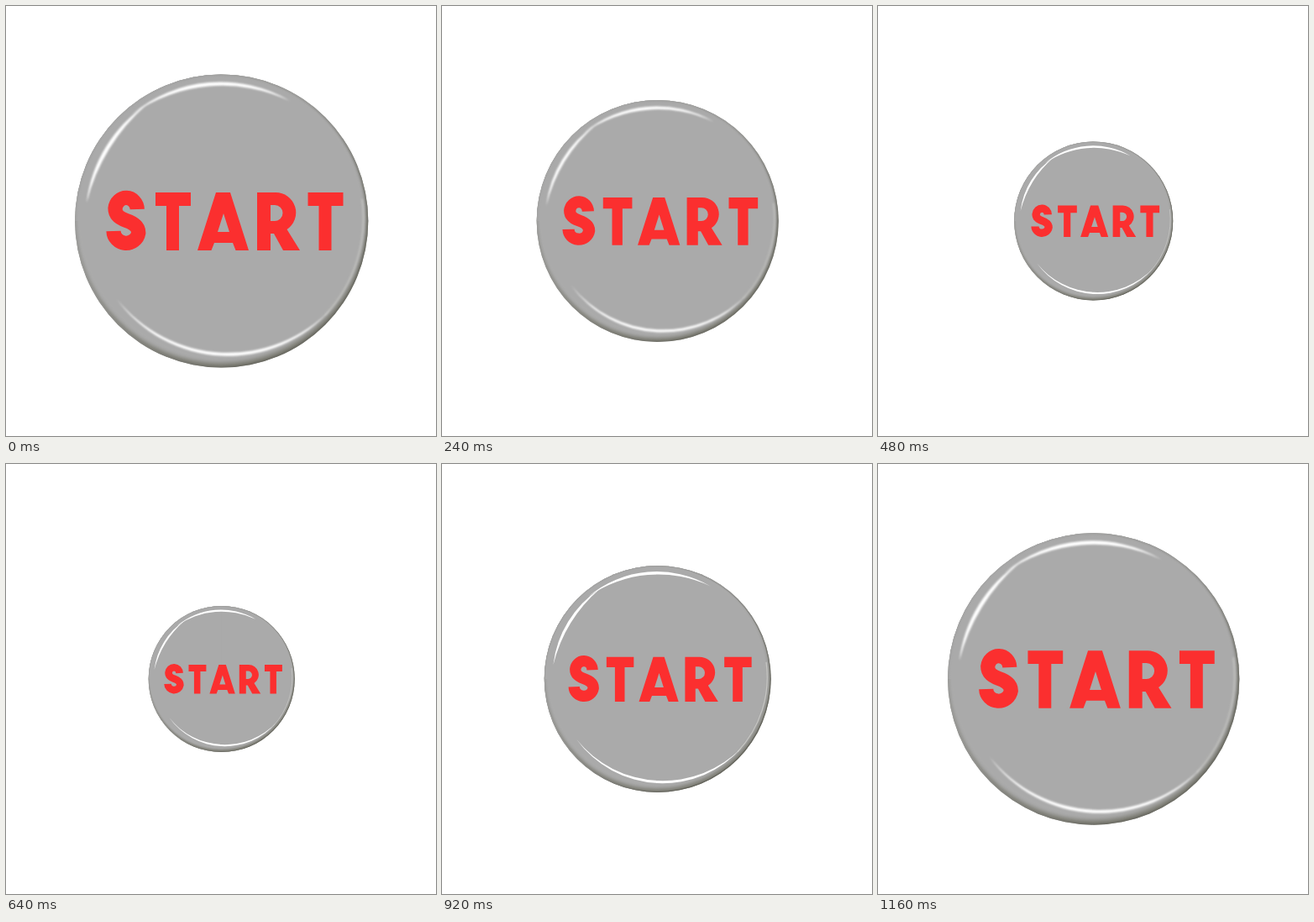
Animation, 512 px wide and 512 px high, one loop 1200 ms. Source, as an HTML page:

```html
<!DOCTYPE html>
<html lang="en">
<head>
<meta charset="utf-8">
<title>Start button</title>
<style>
  html, body { margin: 0; width: 100%; height: 100%; overflow: hidden; background: #fff; }
  svg { display: block; width: 100vw; height: 100vh; }
  text { font: 900 90px Inter, Arial, sans-serif; fill: transparent; }
</style>
</head>
<body>
<svg viewBox="0 0 512 512" role="img" aria-label="START">
  <defs>
    <linearGradient id="edge" x1=".2" y1=".1" x2=".85" y2=".75">
      <stop offset="0" stop-color="#a4a4a4"/>
      <stop offset=".45" stop-color="#969694"/>
      <stop offset="1" stop-color="#66665e"/>
    </linearGradient>
    <filter id="soft" x="-10%" y="-10%" width="120%" height="120%"><feGaussianBlur stdDeviation="2.6"/></filter>
    <filter id="glow" x="-10%" y="-20%" width="120%" height="140%"><feGaussianBlur stdDeviation="1"/></filter>
    <clipPath id="disc"><circle cx="256.7" cy="256" r="174.6"/></clipPath>
  </defs>
  <g id="button">
    <circle cx="256.7" cy="256" r="174.6" fill="#7c7c73"/>
    <g clip-path="url(#disc)">
      <circle cx="255.5" cy="251" r="173.5" fill="#aaa" stroke="#aaa" stroke-width="1" filter="url(#soft)"/>
      <path d="M256 81A174 174 0 0 0 82 256L256 256Z" fill="#aaa"/>
      <circle cx="256.7" cy="256" r="174.3" fill="none" stroke="url(#edge)" stroke-width="2.6" filter="url(#glow)"/>
    </g>
    <g filter="url(#glow)">
      <path d="M424 230A168 168 0 0 1 380 368" fill="none" stroke="#c6c6c3" stroke-width="1.6"/>
      <g fill="#fff">
        <path d="M96 234A163 163 0 0 1 168 117A228 228 0 0 0 96 234Z"/>
        <path d="M150 129A163 163 0 0 1 338 113A187 187 0 0 0 150 129Z"/>
        <path d="M132 349A163 163 0 0 0 387 361A170 170 0 0 1 132 349Z"/>
      </g>
    </g>
    <text x="120" y="291">START</text>
    <g fill="#fb2f2f" fill-rule="evenodd">
      <path d="M156.3 242A13.2 14.2 0 0 0 130 241C130 249 135 252.5 143 255.3C151 258 157.8 262 157.8 270A15 14.7 0 0 1 128 268" fill="none" stroke="#fb2f2f" stroke-width="17.2"/>
      <path id="t" d="M178 222H220V238H206V291H191V238H178Z"/>
      <path d="M250 222H267L289 291H273.5L270 282H248L244.5 291H228ZM259 247L252 269H266Z"/>
      <path d="M299 222H321A24 24 0 0 1 334.5 266L350 291H330L319 271H315V291H299ZM315 237V256H320A9.5 9.5 0 0 0 320 237Z"/>
      <use href="#t" x="181.5"/>
    </g>
  </g>
</svg>
<script>
  const LOOP = 1200, STEP = 40, CX = 256.7, CY = 256;
  const button = document.getElementById('button');

  function draw(ms) {
    const t = Math.floor((ms % LOOP) / STEP) * STEP;
    const s = 1 - 0.2535 * (1 - Math.cos(2 * Math.PI * t / LOOP));
    button.setAttribute('transform', `translate(${CX} ${CY}) scale(${s}) translate(${-CX} ${-CY})`);
  }

  let start;
  function tick(now) {
    start ??= now;
    draw(now - start);
    requestAnimationFrame(tick);
  }
  draw(0);
  requestAnimationFrame(tick);
</script>
</body>
</html>
```
